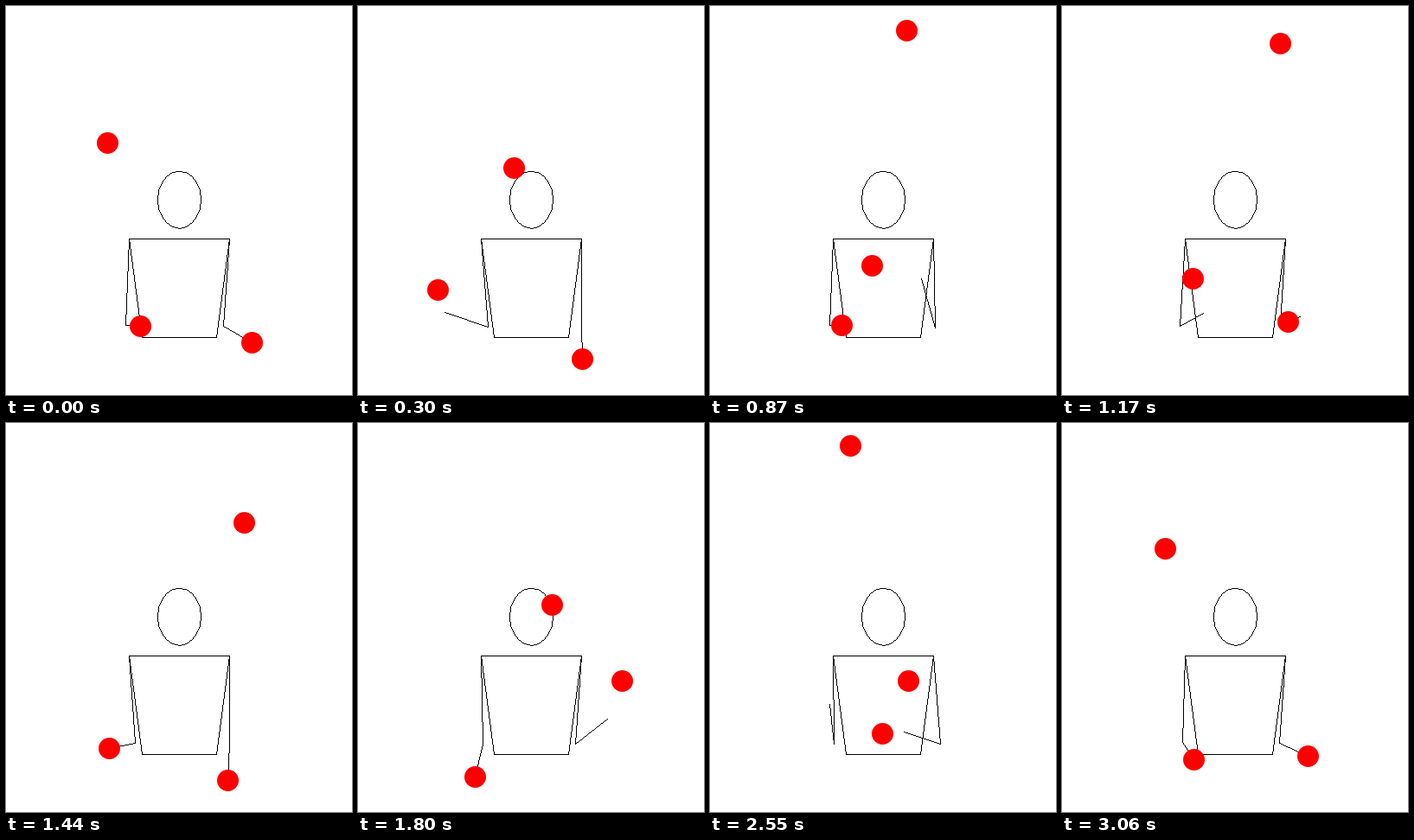
Write an HTML page with a canvas that moves like this. It is 400 px wide and 450 px high and loops after 3.09 s.

```html
<!DOCTYPE html>
<html lang="en">
<head>
<meta charset="utf-8">
<title>Juggling 531</title>
<style>
html, body { margin: 0; width: 100%; height: 100%; overflow: hidden; background: #fff; }
canvas { display: block; }
</style>
</head>
<body>
<canvas id="stage" width="400" height="450"></canvas>
<script>
const ctx = document.getElementById('stage').getContext('2d');

const STEP = 30, STEPS = 103, BEATS = 6;
const SCALE = 2.52, OX = 200, OY = 370;   // centimetres to pixels
const G = 80;                             // cm per beat squared
const ARM = 41, REACH = 30;
const SHOULDER = { x: 23, z: 40 }, WAIST = { x: 17, z: -5 };

// The left hand's throws (a 5, a 1 and a 3), each followed by its next catch.
// Times in beats, x in cm; the right hand is the mirror image three beats later.
const moves = [
  { t: 0, x: -18, to: 45, air: 3.7, catchT: 0.7, catchX: -45 },
  { t: 1.675, x: -20, to: 30, air: 0.675, catchT: 2.7, catchX: -30 },
  { t: 4, x: -12, to: 30, air: 1.7, catchT: 5.35, catchX: -30 }
];
for (const m of moves) {
  m.vx = (m.to - m.x) / m.air;
  m.vz = G * m.air / 2;
}

function hermite(p0, v0, p1, v1, h, s) {
  const r = 1 - s;
  return p0 + (p1 - p0) * s * s * (3 - 2 * s) + h * (v0 * s * r * r - v1 * s * s * r);
}

// Smooth path throw -> catch -> next throw, with matched acceleration at the catch.
function spline(a, va, b, c, vc, h0, h1, u) {
  const rhs = 3 * ((b - a) / (h0 * h0) + (c - b) / (h1 * h1));
  const vb = (rhs - va / h0 - vc / h1) / (2 * (1 / h0 + 1 / h1));
  return u < h0
    ? hermite(a, va, b, vb, h0, u / h0)
    : hermite(b, vb, c, vc, h1, (u - h0) / h1);
}

function handAt(u) {
  const i = u < moves[1].t ? 0 : u < moves[2].t ? 1 : 2;
  const m = moves[i], n = moves[(i + 1) % 3];
  const end = i === 2 ? BEATS : n.t;
  const h0 = m.catchT - m.t, h1 = end - m.catchT, du = u - m.t;
  return {
    x: spline(m.x, m.vx, m.catchX, n.x, n.vx, h0, h1, du),
    z: spline(0, m.vz, 0, 0, n.vz, h0, h1, du),
    holding: u >= m.catchT
  };
}

function elbowFor(hand) {
  const dx = hand.x + SHOULDER.x, dz = hand.z - SHOULDER.z;
  const flat = Math.hypot(dx, REACH), d = Math.hypot(flat, dz);
  const drop = Math.sqrt(Math.max(0, ARM * ARM - d * d / 4));
  const k = 0.5 * (1 + drop * (dz / flat) / (d / 2));
  return { x: -SHOULDER.x + dx * k, z: SHOULDER.z + dz / 2 - drop * flat / d };
}

const px = (p, side) => [Math.round(OX + side * p.x * SCALE), Math.round(OY - p.z * SCALE)];

// One-pixel line without smoothing
function line([x0, y0], [x1, y1]) {
  const dx = Math.abs(x1 - x0), dy = -Math.abs(y1 - y0);
  const sx = x0 < x1 ? 1 : -1, sy = y0 < y1 ? 1 : -1;
  let err = dx + dy;
  for (;;) {
    ctx.fillRect(x0, y0, 1, 1);
    if (x0 === x1 && y0 === y1) return;
    const e = 2 * err;
    if (e >= dy) { err += dy; x0 += sx; }
    if (e <= dx) { err += dx; y0 += sy; }
  }
}

function path(points, closed) {
  for (let i = 1; i < points.length; i++) line(points[i - 1], points[i]);
  if (closed) line(points[points.length - 1], points[0]);
}

const torso = [px(SHOULDER, -1), px(SHOULDER, 1), px(WAIST, 1), px(WAIST, -1)];
const head = Array.from({ length: 20 }, (_, i) => {
  const a = i * Math.PI / 10;
  return [Math.floor(200.5 + 25 * Math.cos(a)), Math.floor(224.1 + 33 * Math.sin(a))];
});

function ball(p, side) {
  const [x, y] = px(p, side);
  ctx.beginPath();
  ctx.arc(x + 0.5, y + 0.5, 12.5, 0, Math.PI * 2);
  ctx.fill();
}

function draw(ms) {
  const beat = Math.floor(ms / STEP) % STEPS * BEATS / STEPS;
  ctx.fillStyle = '#fff';
  ctx.fillRect(0, 0, 400, 450);

  ctx.fillStyle = '#000';
  path(head, true);
  path(torso, true);
  const balls = [];
  for (const side of [1, -1]) {
    const u = side === 1 ? beat : (beat + 3) % BEATS;
    const hand = handAt(u);
    path([px({ x: -SHOULDER.x, z: SHOULDER.z }, side), px(elbowFor(hand), side), px(hand, side)]);
    if (hand.holding) balls.push([hand, side]);
    for (const m of moves) {
      const s = u - m.t;
      if (s >= 0 && s < m.air) balls.push([{ x: m.x + m.vx * s, z: m.vz * s - G * s * s / 2 }, side]);
    }
  }

  ctx.fillStyle = '#f00';
  for (const [p, side] of balls) ball(p, side);
}

const start = performance.now();
function tick() {
  draw(performance.now() - start);
  requestAnimationFrame(tick);
}
tick();
</script>
</body>
</html>
```
